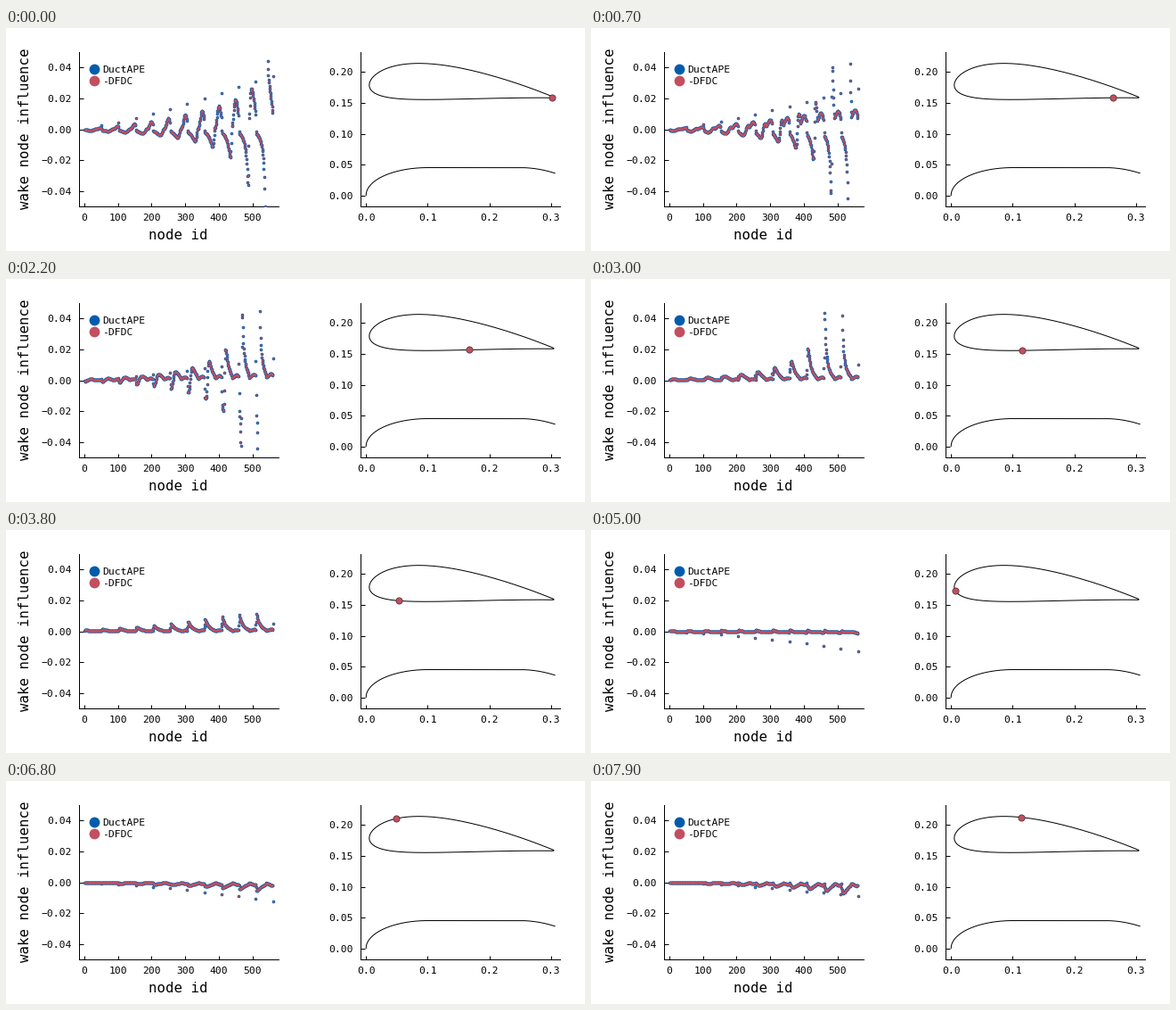
Animation, 650 px wide and 250 px high, one loop 8 s. Source, as a matplotlib script:

```python
import numpy as np
import matplotlib.pyplot as plt
from matplotlib.animation import FuncAnimation

W, H, DPI = 650, 250, 100
FRAMES, STEP = 80, 100
PX = 72 / DPI
BLUE, RED = "#005cab", "#c24f5f"
SHEETS, FORE, AFT = 11, 30, 20
LE, TE = 0.0052, 0.3045          # duct edges
CHORD = TE - LE

plt.rcParams["font.family"] = "DejaVu Sans Mono"


# --- geometry -------------------------------------------------------------

def duct(p):
    """Duct wall, p from -1 (inner trailing edge) over 0 to 1 (outer)."""
    u = p * p
    camber = np.polyval([-0.0300, 0.0868, -0.1272, 0.0503, 0.1790], u)
    thickness = np.polyval([-0.0168, 0.0603, -0.1307, 0.0878], u)
    return LE + CHORD * u, camber + p * thickness


def track(k):
    """Wall parameter of panel k: even steps to the rotor, then round the nose."""
    k = np.asarray(k, float)
    n = np.clip(k + 0.5, 0, FORE)
    gone = 0.00637 * n - 0.0066 * (1 - np.exp(-n / 2.5))
    aft = -np.sqrt(1 - gone / CHORD)
    d = k - 52.85
    nose = d * np.polyval([-1.92e-6, -3.24e-5, 0.0148], d) / np.sqrt(CHORD)
    return np.where(k <= FORE - 0.5, aft, nose)


def hub(x):
    x = np.minimum(x, 0.3064)
    nose = np.sqrt(1 - np.clip(1 - x / 0.1, 0, 1) ** 2)
    tail = np.clip((x - 0.25) / 0.0564, 0, 1) ** 2
    return 0.0449 * nose - 0.009 * tail


def wake_grid():
    """Nodes of every sheet, rotor to wake end, by equal annulus area."""
    fore = track(FORE - 0.5 - np.arange(FORE + 1))
    x, outer = duct(np.append(fore, -np.ones(AFT)))
    x[FORE + 1:] += np.cumsum(0.0022 * 1.155 ** np.arange(AFT))
    inner = hub(x)
    r0 = np.linspace(inner[0], outer[0], SHEETS)
    share = (r0 ** 2 - inner[0] ** 2) / (outer[0] ** 2 - inner[0] ** 2)
    r = np.sqrt(inner ** 2 + share[:, None] * (outer ** 2 - inner ** 2))
    return x, r


# --- vortex rings ---------------------------------------------------------

def elliptic(m):
    """Complete integrals K and E by the arithmetic-geometric mean."""
    a, b, total, scale = np.ones_like(m), np.sqrt(1 - m), m / 2, 1.0
    for _ in range(7):
        a, b, c = (a + b) / 2, np.sqrt(a * b), (a - b) / 2
        total = total + scale * c * c
        scale *= 2
    K = np.pi / (2 * a)
    return K, K * (1 - total)


def ring_velocity(xp, rp, x, r):
    z = xp - x
    far, near = (r + rp) ** 2 + z * z, (r - rp) ** 2 + z * z
    K, E = elliptic(4 * r * rp / far)
    root = 2 * np.pi * np.sqrt(far)
    vx = (K + (r * r - rp * rp - z * z) / near * E) / root
    vr = z / rp * ((r * r + rp * rp + z * z) / near * E - K) / root
    return vx, vr


def influence(k, x, r):
    """Normal velocity on panel k for unit strength at each wake node."""
    p = track(k)
    xp, rp = duct(p)
    (xa, ra), (xb, rb) = duct(p - 1e-3), duct(p + 1e-3)
    size = np.hypot(xb - xa, rb - ra)
    nx, nr = (ra - rb) / size, (xb - xa) / size

    ds = np.hypot(np.diff(x), np.diff(r, axis=1))
    weight = np.zeros_like(r)
    weight[:, :-1] += ds / 2
    weight[:, 1:] += ds / 2
    vx, vr = ring_velocity(xp, rp, x[None, :], r)
    out = (vx * nx + vr * nr) * weight

    # the last node also carries the endless tube behind it
    u = np.linspace(0, 5, 80)
    vx, vr = ring_velocity(xp, rp, x[-1] + 0.05 * (np.exp(u) - 1), r[:, -1:])
    f = (vx * nx + vr * nr) * 0.05 * np.exp(u)
    out[:, -1] += (f[:, 1:] + f[:, :-1]).sum(axis=1) * (u[1] - u[0]) / 2
    return out.ravel()


wake_x, wake_r = wake_grid()
values = [influence(k, wake_x, wake_r) for k in range(FRAMES)]
ids = np.arange(1, values[0].size + 1)

# --- figure ---------------------------------------------------------------

fig = plt.figure(figsize=(W / DPI, H / DPI), dpi=DPI, facecolor="white")


def make_axes(left, xlim, ylim, xticks, yticks, xfmt):
    ax = fig.add_axes([left / W, 50 / H, 224 / W, 173 / H])
    ax.set(xlim=xlim, ylim=ylim)
    ax.spines[["top", "right"]].set_visible(False)
    for edge in ("left", "bottom"):
        ax.spines[edge].set_linewidth(PX)
    ax.tick_params(direction="in", length=4.5 * PX, width=PX, labelsize=8.2)
    ax.tick_params(axis="x", pad=7.5 * PX)
    ax.tick_params(axis="y", pad=8 * PX)
    ax.set_xticks(xticks, [xfmt.format(v) for v in xticks])
    ax.set_yticks(yticks, [f"{v:.2f}".replace("-", "\u2212") for v in yticks])
    return ax


def label(x, y, text, size, **kw):
    fig.text(x / W, 1 - y / H, text, fontsize=size, va="center", **kw)


def dots(ax, d, color, **kw):
    return ax.scatter([], [], s=(d * PX) ** 2, color=color, **kw)


plot = make_axes(82, (-15.8, 577.8), (-0.05, 0.05),
                 range(0, 600, 100), np.arange(-2, 3) * 0.02, "{:d}")
side = make_axes(398, (-0.009, 0.3149), (-0.0181, 0.2326),
                 np.arange(4) * 0.1, np.arange(5) * 0.05, "{:.1f}")

label(193.7, 232.4, "node id", 11.3, ha="center")
label(21.8, 112.5, "wake node influence", 11.3, ha="center", rotation=90)

blue = dots(plot, 3.6, BLUE, linewidths=0, zorder=3)
red = dots(plot, 2.1, RED, linewidths=0, zorder=4)

for y, color, name in ((46.3, BLUE, "DuctAPE"), (59.3, RED, "-DFDC")):
    key = dots(plot, 11.8, color, linewidths=0, zorder=5)
    key.set_offsets([plot.transData.inverted().transform((99.4, H - y))])
    label(108.2, y + 0.5, name, 8.2, ha="left")

side.plot(*duct(np.linspace(-1, 1, 400)), "k", lw=PX)
hub_x = 0.3064 * np.linspace(0, 1, 300) ** 2
side.plot(hub_x, hub(hub_x), "k", lw=PX)
spot = dots(side, 7.2, RED, zorder=5)
spot.set_edgecolor("#4a3038")
spot.set_linewidth(0.55)


def draw(k):
    for series in (blue, red):
        series.set_offsets(np.column_stack([ids, values[k]]))
    spot.set_offsets([duct(track(k))])
    return blue, red, spot


anim = FuncAnimation(fig, draw, frames=FRAMES, interval=STEP,
                     repeat=True, repeat_delay=0)
plt.show()
```
